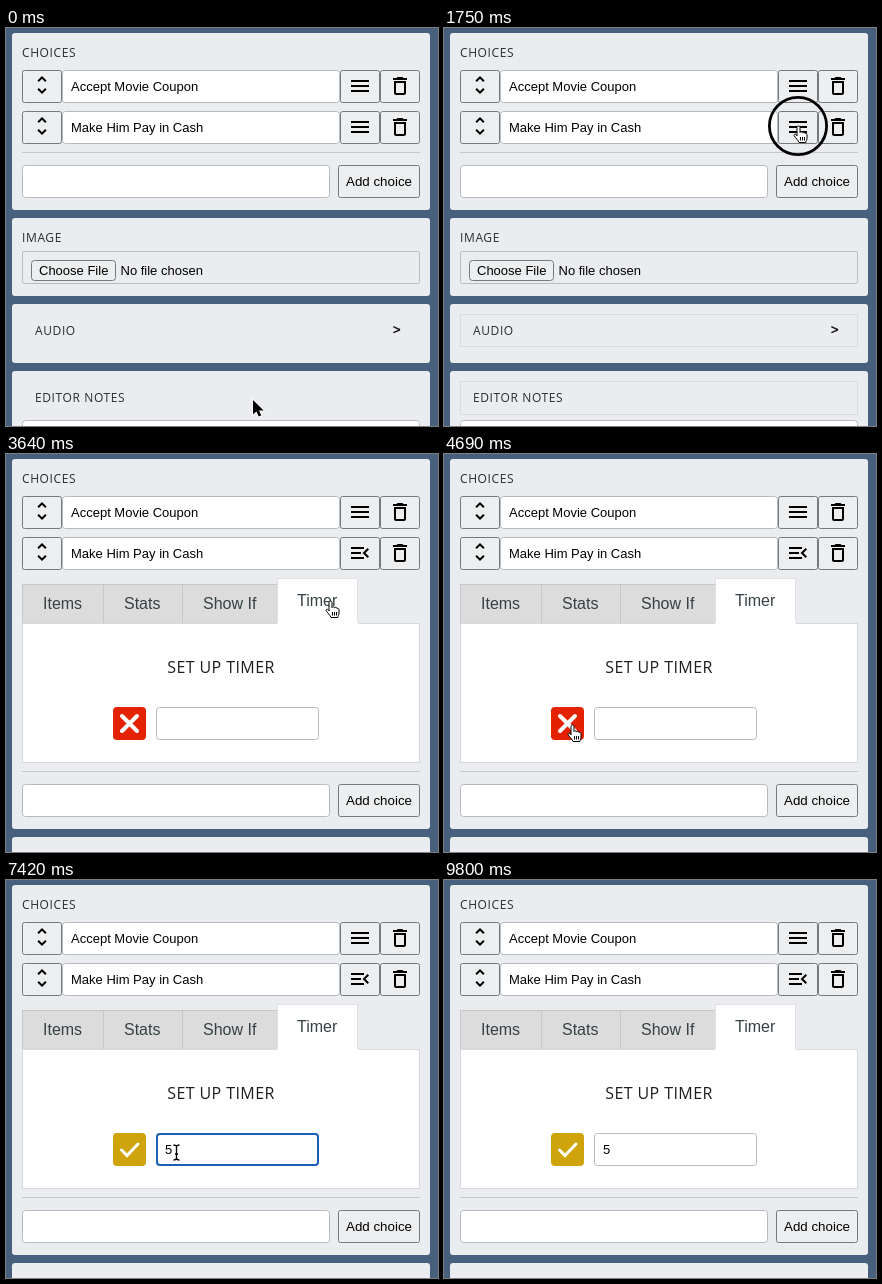
An HTML page that plays this animation: 432x398 px, repeating every 9940 ms.

```html
<!DOCTYPE html>
<html lang="en">
<head>
<meta charset="utf-8">
<title>Choice timer</title>
<style>
html, body { margin: 0; width: 100%; height: 100%; overflow: hidden; background: #47607d; }
svg { display: block; }
text { font: 13px "Liberation Sans", Arial, sans-serif; fill: #000; white-space: pre; }
.label { font: 12px "Open Sans", sans-serif; letter-spacing: .6px; fill: #2b2d30; }
.head { font: 16px "Open Sans", sans-serif; fill: #1c1e20; text-anchor: middle; }
.tab { font-size: 16px; fill: #364044; }
.btn { font-size: 13.33px; text-anchor: middle; }
</style>
</head>
<body>
<svg id="stage" width="432" height="398" viewBox="0 0 432 398"></svg>
<script>
const LOOP = 9940, STEP = 70;

const ICONS = {
  sort: 'M12 5.83 15.17 9l1.41-1.41L12 3 7.41 7.59 8.83 9zM12 18.17 8.83 15l-1.41 1.41L12 21l4.59-4.59L15.17 15z',
  menu: 'M3 18h18v-2H3zM3 13h18v-2H3zM3 6v2h18V6z',
  menuOpen: 'M3 18h13v-2H3zM3 13h10v-2H3zM3 6v2h13V6zM21 15.59 17.42 12 21 8.41 19.59 7l-5 5 5 5z',
  bin: 'M16 9v10H8V9h8m-1.5-6h-5l-1 1H5v2h14V4h-3.5zM18 7H6v12c0 1.1.9 2 2 2h8c1.1 0 2-.9 2-2z'
};

// Markup helpers
const box = (x, y, w, h, fill, stroke, r = 2, more = '') =>
  `<rect x="${x + .5}" y="${y + .5}" width="${w - 1}" height="${h - 1}" rx="${r}" fill="${fill}" stroke="${stroke}" ${more}/>`;
const text = (s, x, y, cls = '', more = '') => `<text x="${x}" y="${y}" class="${cls}" ${more}>${s}</text>`;
const group = (id, body) => `<g id="${id}">${body}</g>`;
const icon = (name, x, y) => `<path d="${ICONS[name]}" transform="translate(${x} ${y})"/>`;
const panel = (y, h) => `<rect x="6" y="${y}" width="418" height="${h}" rx="3" fill="#eaecef"/>`;
const button = (x, y, w, h, r) => box(x, y, w, h, '#eceeef', '#777a7d', r);
const input = (x, y, w, h) => box(x, y, w, h, '#fff', '#b6babe', 3);
const rule = y => `<path d="M16 ${y + .5}H414" stroke="#c3c7ca"/>`;

const row = (y, label, menu) =>
  button(16, y, 40, 33) + icon('sort', 24, y + 3) +
  input(56, y, 278, 33) + text(label, 65, y + 21) +
  button(334, y, 40, 33) + menu +
  button(374, y, 40, 33) + icon('bin', 382, y + 4);

const TABS = [['Items', 16, 37], ['Stats', 97, 118], ['Show If', 176, 197], ['Timer', 271, 292], ['', 352]];
const tabs = (active, bottom) =>
  TABS.slice(0, 4).map(([name, x, tx], i) => i == active ? '' :
    box(x, 130, TABS[i + 1][1] - x + 1, 40, '#dcdcdc', '#c6c7c8', 0) + text(name, tx, 155, 'tab')).join('') +
  box(16, 169, 398, bottom - 169, '#fff', '#d6d8da', 0) +
  TABS.slice(active, active + 1).map(([name, x, tx]) =>
    box(x, 124, TABS[active + 1][1] - x, 47, '#fff', '#dfe1e2', 0) +
    `<path d="M${x} 169h${TABS[active + 1][1] - x}v3h${x - TABS[active + 1][1]}z" fill="#fff"/>` +
    text(name, active ? tx - 1 : tx, 152, 'tab')).join('');

const lower =
  rule(124) + input(16, 137, 308, 33) +
  button(332, 137, 82, 33) + text('Add choice', 373, 158, 'btn') +
  panel(190, 78) + text('IMAGE', 16, 214, 'label') +
  box(16, 223, 398, 33, 'none', '#b9bdc0') +
  button(25, 232, 85, 21, 3) + text('Choose File', 33, 247) + text('No file chosen', 114.5, 247) +
  panel(276, 59) + panel(343, 80) +
  group('frames', box(16, 286, 398, 33, 'none', '#dadddf', 0) + box(16, 353, 398, 34, 'none', '#dadddf', 0)) +
  text('AUDIO', 29, 307, 'label') + text('&gt;', 387, 306, '', 'stroke="#000" stroke-width=".4"') +
  text('EDITOR NOTES', 29, 374, 'label') + input(16, 392, 398, 60);

const items = tabs(0, 382) +
  text('ADD/REMOVE ITEMS', 215, 219, 'head', 'letter-spacing=".4"') +
  text('No items', 215, 271, 'head', 'letter-spacing=".1"') +
  '<circle cx="215" cy="327" r="20" fill="#544f5f"/>' +
  '<path d="M209 327h12M215 321v12" stroke="#fff" stroke-width="3.6" stroke-linecap="round"/>';

const toggle = (id, fill, mark, w) => group(id,
  `<rect x="107" y="253" width="33" height="33" rx="4" fill="${fill}"/>` +
  `<path d="${mark}" fill="none" stroke="#fff" stroke-width="${w}" stroke-linecap="round"/>`);

const timer = tabs(3, 309) +
  text('SET UP TIMER', 215, 219, 'head', 'letter-spacing=".4"') +
  toggle('off', '#e42200', 'M116 262l15 15M131 262l-15 15', 4) +
  toggle('on', '#cfa30c', 'M115.5 270l5.5 5.5 11-11.5', 3) +
  input(150, 253, 163, 33) +
  group('focus', '<rect x="151" y="254" width="161" height="31" rx="3" fill="none" stroke="#1f5fbb" stroke-width="2"/>') +
  group('digit', text('5', 159, 274)) +
  '<path id="caret" stroke="#000" d="M.5 262v15"/>';

const pointers =
  group('arrow', '<path d="M0 0v14.6l3.4-3.2 2.3 5.2 2.6-1.1-2.3-5h4.7z" stroke="#fff" stroke-width="1.6" paint-order="stroke"/>') +
  group('hand', '<path transform="translate(-5)" d="M4 1.5c0-2 3-2 3 0v5c.3-1 2.4-.9 2.6.3.5-.8 2.3-.6 2.4.7.8-.5 2 0 2 1.2V12c0 2-1 2.7-1.2 4.5H6c-.5-2-4-5-4.8-6.8C.6 8.400 2.400 7.700 3.500 9l.5.8zM7.500 11v3.500M9.500 11v3.500M11.500 11v3.500" fill="#fff" stroke="#000"/>') +
  group('beam', '<path d="M-3-7.500q3 0 3 2v11q0 2-3 2M3-7.500q-3 0-3 2M0 5.500q0 2 3 2M-1.500 1.500h3" fill="none" stroke="#000" stroke-width="1.300"/>');

const $ = id => document.getElementById(id);
const show = (id, on) => { $(id).style.display = on ? '' : 'none'; };

$('stage').innerHTML =
  '<rect width="432" height="398" fill="#47607d"/>' +
  '<rect id="top" x="6" y="5" width="418" rx="3" fill="#eaecef"/>' +
  text('CHOICES', 16, 29, 'label') +
  row(42, 'Accept Movie Coupon', icon('menu', 342, 46)) +
  row(83, 'Make Him Pay in Cash', group('shut', icon('menu', 342, 87)) + group('open', icon('menuOpen', 342, 87))) +
  group('lower', lower) + group('items', items) + group('timer', timer) +
  '<circle id="ring" fill="none" stroke="#000" stroke-width="2.800"/>' + group('pointer', pointers);

// Pointer stops: time, x, y
const PATH = [
  [0, 247, 372], [980, 358, 105], [1400, 358, 105], [1680, 354, 98], [2030, 354, 98],
  [2590, 324, 147], [3710, 324, 147], [4690, 128, 271], [4760, 128, 271], [5040, 211, 266],
  [7210, 211, 266], [7630, 130, 279], [8050, 55, 228], [8260, 55, 228], [8470, 55, 234],
  [9170, 55, 234], [9800, 178, 402], [LOOP, 178, 402]
];
// Click rings: start, end, first radius, last radius
const RINGS = [[980, 1120, 20.5, 20.5], [1680, 1820, 21, 28.6], [3150, 3290, 21, 31],
  [4760, 4830, 29, 29], [5460, 5530, 16, 16], [8120, 8190, 20.5, 20.5]];

const within = (t, a, b) => t >= a && t < b;

function pointerAt(t) {
  const i = PATH.findIndex(p => p[0] > t);
  const [t0, x0, y0] = PATH[i - 1], [t1, x1, y1] = PATH[i];
  const u = (t - t0) / (t1 - t0), k = u * u * (3 - 2 * u);
  return [x0 + (x1 - x0) * k, y0 + (y1 - y0) * k];
}

function pointerKind(t, x, y) {
  const over = (a, b, c, d) => x >= a && x < c && y >= b && y < d;
  if (t < 1820 && over(332, 137, 414, 170)) return 'hand';
  if (over(334, 83, 414, 116) || t >= 1820 && over(16, 124, 352, 169)) return 'hand';
  if (t >= 3220 && over(107, 253, 140, 286)) return 'hand';
  return t >= 3220 && over(150, 253, 313, 286) ? 'beam' : 'arrow';
}

function draw(t) {
  const opened = t >= 1820, timing = t >= 3220, shift = timing ? 193 : opened ? 266 : 0;
  $('top').setAttribute('height', 177 + shift);
  $('lower').setAttribute('transform', `translate(0 ${shift})`);
  show('frames', t >= STEP);
  show('shut', !opened);
  show('open', opened);
  show('items', opened && !timing);
  show('timer', timing);
  show('off', t < 4830);
  show('on', t >= 4830);
  show('focus', within(t, 5530, 8120));
  show('digit', t >= 6580);
  show('caret', within(t, 5530, 6020) || within(t, 6510, 7140) || within(t, 7630, 8120));
  $('caret').setAttribute('transform', `translate(${t < 6580 ? 159 : 166} 0)`);

  const [x, y] = pointerAt(t), kind = pointerKind(t, x, y);
  $('pointer').setAttribute('transform', `translate(${x} ${y})`);
  show('pointer', !within(t, 6580, 7280));
  for (const id of ['arrow', 'hand', 'beam']) show(id, id == kind);

  const ring = RINGS.find(([a, b]) => within(t, a, b));
  show('ring', ring);
  if (ring) {
    const [a, b, r0, r1] = ring, steps = Math.max(1, (b - a) / STEP - 1);
    $('ring').setAttribute('cx', x);
    $('ring').setAttribute('cy', y);
    $('ring').setAttribute('r', r0 + (r1 - r0) * (t - a) / STEP / steps);
  }
}

const start = performance.now();
function tick() {
  const t = (performance.now() - start) % LOOP;
  draw(Math.floor(t / STEP) * STEP);
  requestAnimationFrame(tick);
}
tick();
</script>
</body>
</html>
```
